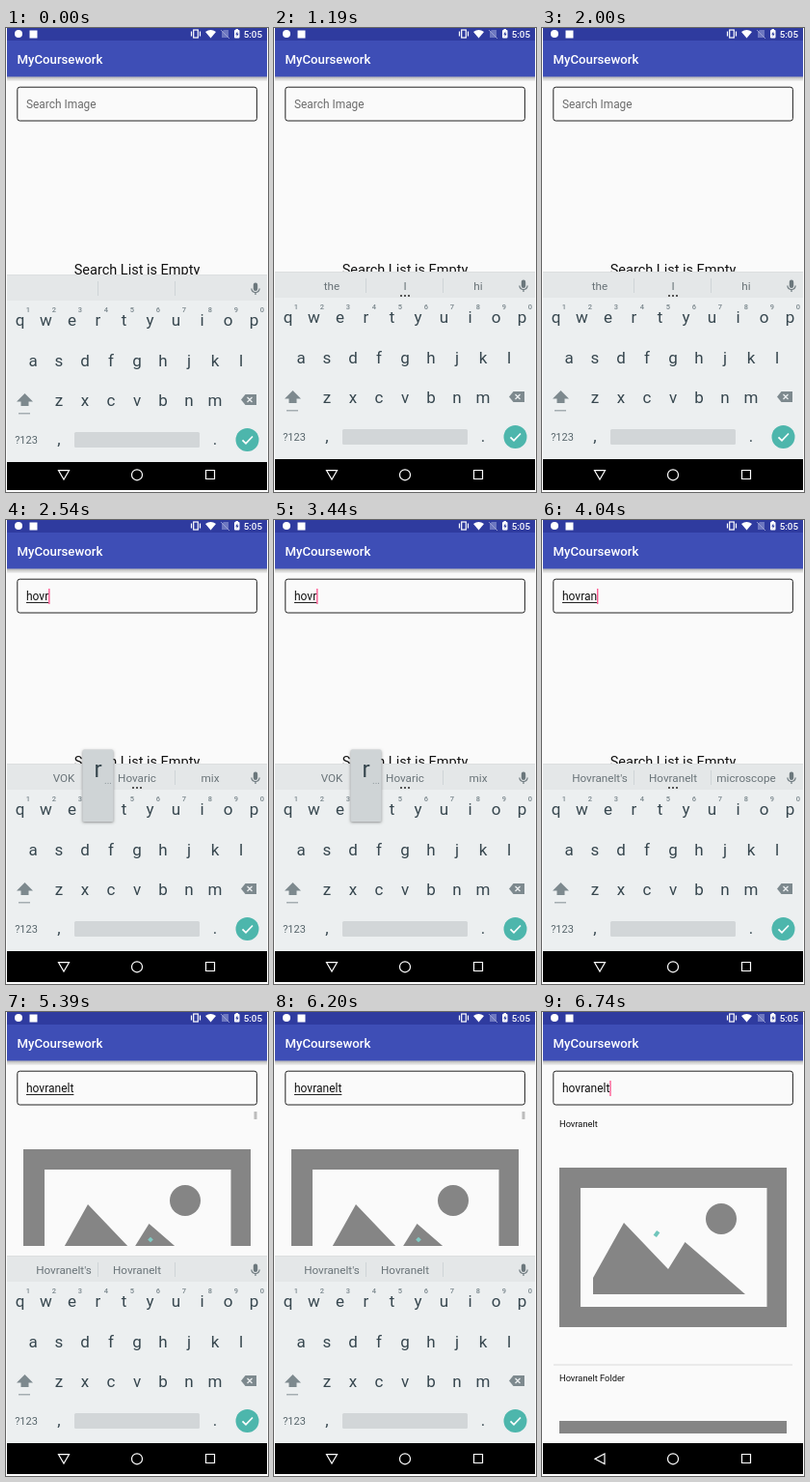
Animation, 272 px wide and 480 px high, one loop 8 s. Source, as an HTML page with a canvas:

```html
<!DOCTYPE html>
<html lang="en">
<head>
<meta charset="utf-8">
<title>Image search</title>
<style>
  html, body { margin: 0; width: 100%; height: 100%; overflow: hidden; background: #fff; }
  canvas { display: block; width: 272px; height: 480px; }
</style>
</head>
<body>
<canvas id="stage"></canvas>
<script>
const canvas = document.getElementById('stage');
const scale = window.devicePixelRatio || 1;
canvas.width = 272 * scale;
canvas.height = 480 * scale;
const c = canvas.getContext('2d');

const LOOP = 8000;
const NAME = 'Hovranelt';
const GREY = '#858585', TEAL = '#4db6ac', INK = '#37474f', KEY_ICON = '#7d898e';
const PAGE = '#fafafa', KEYS = '#eceff0';

const scenes = [
  { at: 0, drop: 3, hints: [] },
  { at: 1190, hints: ['the', 'I', 'hi'], more: true },
  { at: 2540, typed: 4, caret: true, hints: ['VOK', 'Hovaric', 'mix'], more: true, popup: true },
  { at: 4040, typed: 6, caret: true, hints: [NAME + "'s", NAME, 'microscope'], more: true },
  { at: 5390, typed: 9, hints: [NAME + "'s", NAME], results: true },
  { at: 6740, typed: 9, caret: true, results: true }
];

function box(x, y, w, h, color, radius = 0) {
  c.fillStyle = color;
  c.beginPath();
  c.roundRect(x, y, w, h, radius);
  c.fill();
}

function disc(x, y, r, color) {
  c.fillStyle = color;
  c.beginPath();
  c.arc(x, y, r, 0, Math.PI * 2);
  c.fill();
}

function shape(path, color) {
  c.fillStyle = color;
  c.fill(new Path2D(path));
}

function line(path, color, width = 1) {
  c.strokeStyle = color;
  c.lineWidth = width;
  c.stroke(new Path2D(path));
}

function text(str, x, y, size, color, align = 'left', weight = 400) {
  c.font = `${weight} ${size}px Roboto, sans-serif`;
  c.textAlign = align;
  c.fillStyle = color;
  c.fillText(str, x, y);
}

function tilted(x, y, w, h, angle, color) {
  c.save();
  c.translate(x, y);
  c.rotate(angle * Math.PI / 180);
  box(-w / 2, -h / 2, w, h, color);
  c.restore();
}

function drawBars() {
  box(1, 0, 270, 13, '#2f3b9f');
  box(1, 13, 270, 37.5, '#3e4eb6');
  const shade = c.createLinearGradient(0, 50.5, 0, 55.5);
  shade.addColorStop(0, 'rgba(0,0,0,.28)');
  shade.addColorStop(1, 'rgba(0,0,0,0)');
  box(1, 50.5, 270, 5, shade);
  text('MyCoursework', 11.5, 37, 13.2, '#fff', 'left', 500);

  disc(13, 6, 4, '#fff');
  box(24.5, 2.5, 8, 8, '#fff');
  c.strokeStyle = '#fff';
  c.lineWidth = 1.2;
  c.strokeRect(194.7, 2, 4.6, 8);
  line('M192.5 3.5V8.5M201.5 3.5V8.5', '#fff', 1.2);
  shape('M207 4Q212.5 0 218 4L212.5 10.5Z', '#fff');
  shape('M224 4L226 2H231V10H224Z', '#6d77c0');
  line('M223 2L232 11', '#a5abd8', .8);
  box(237, 2, 5.5, 8.5, '#fff', 1);
  box(238.5, 1, 2.5, 2, '#fff');
  shape('M240.3 3.5L238.3 6.7H239.6V9L241.6 5.8H240.3Z', '#303f9f');
  text('5:05', 266, 10, 9.8, '#fff', 'right', 500);
}

function drawField(s) {
  c.strokeStyle = '#222';
  c.lineWidth = 1;
  c.beginPath();
  c.roundRect(11.8, 61.2, 248.6, 34.8, 2.5);
  c.stroke();
  if (!s.typed) {
    text('Search Image', 21, 83.2, 11.9, '#6c6c6c');
    return;
  }
  const word = NAME.toLowerCase().slice(0, s.typed);
  text(word, 21, 83.2, 12, '#111');
  const width = c.measureText(word).width;
  if (s.hints) box(21, 85, width, 1, '#222');
  if (s.caret) box(21 + width, 71, 1.2, 16, '#ff4081');
}

function drawPicture(y) {
  box(18, y, 236, 165, GREY);
  box(40, y + 21, 193.5, 123, PAGE);
  disc(186, y + 53, 16, GREY);
  c.save();
  c.translate(0, y);
  shape('M53 114L85 57L131 105L148.5 77L211 131H53Z', GREY);
  c.restore();
}

function drawResults(s) {
  c.save();
  c.beginPath();
  c.rect(1, 97, 270, s.hints ? 145 : 339);
  c.clip();
  drawPicture(s.hints ? 142 : 161);
  if (!s.hints) {
    text(NAME, 18, 119, 9.3, '#111');
    box(12, 364.5, 248, 1, '#dcdcdc');
    text(NAME + ' Folder', 18, 382, 9.3, '#111');
    drawPicture(423);
  }
  c.restore();
  if (s.hints) {
    tilted(150, 235.5, 4, 4, 45, '#80cbc4');
    box(257.5, 103, 3, 8, '#bdbdbd');
  } else {
    tilted(119, 229.5, 4, 6, 35, '#70c6bc');
  }
}

function drawKeyboard(s) {
  c.save();
  c.translate(0, s.drop || 0);
  box(1, 252, 270, 195, KEYS);
  box(1, 252, 270, 27, '#e4e7e8');
  box(1, 252, 270, 1, '#dcdfe0');
  box(95, 259, 1, 15, '#cfd4d7');
  box(175, 259, 1, 15, '#cfd4d7');
  s.hints.forEach((word, i) => text(word, 60 + 76 * i, 271, 11.7, '#697378', 'center'));
  if (s.more) for (const x of [131, 135, 139]) box(x, 276, 2, 2, '#555');

  box(256.8, 260.5, 4.4, 8.5, '#6b777c', 2.2);
  line('M254.8 266.5Q255.3 270.5 259 270.5Q262.7 270.5 263.2 266.5M259 270.5V273', '#6b777c', 1.2);

  [['qwertyuiop', 14.5, 305], ['asdfghjkl', 28, 346.5], ['zxcvbnm', 55, 387.5]].forEach(([keys, x, y]) =>
    [...keys].forEach((key, i) => text(key, x + 27 * i, y, 17, INK, 'center')));
  [...'1234567890'].forEach((n, i) => text(n, 23 + 27 * i, 291, 7.5, '#78858b', 'center', 500));

  shape('M19.5 375L28 383.5H23.5V388H15.5V383.5H11Z', KEY_ICON);
  box(13, 395, 12, 1.5, '#a4adb1');
  shape('M244 381.5L248.5 376H260V387H248.5Z', KEY_ICON);
  line('M250.5 379L255.5 384M255.5 379L250.5 384', KEYS, 1.3);

  text('?123', 21, 427, 11, '#58666c', 'center');
  text(',', 55, 428, 17, INK, 'center');
  box(71, 415, 130, 16, '#d2d6d8', 1.5);
  text('.', 217, 428, 17, INK, 'center');
  disc(250.5, 423, 12, TEAL);
  line('M245.5 423.3L249 426.8L256 419.5', '#fff', 1.7);

  if (s.popup) {
    c.save();
    c.shadowColor = 'rgba(0,0,0,.4)';
    c.shadowBlur = 3 * scale;
    c.shadowOffsetY = scale;
    box(79.5, 237.5, 32, 74.5, '#cfd4d6', 1.5);
    c.restore();
    text('r', 95.5, 265.5, 24, INK, 'center');
    text('...', 106, 273, 10, '#8a9499', 'center');
  }
  c.restore();
}

function drawNavigation(s) {
  const top = 446 + (s.drop || 0);
  box(1, top, 270, 478 - top, '#000');
  line(s.hints ? 'M54.5 457.7H65.5L60 467Z' : 'M65 457V467.5L55 462.2Z', '#fff', 1.2);
  line('M141.5 462.3A5.5 5.5 0 1 1 130.5 462.3A5.5 5.5 0 1 1 141.5 462.3', '#fff', 1.2);
  line('M207.5 457.5H216.5V466.5H207.5Z', '#fff', 1.2);
}

function draw(now) {
  const t = now % LOOP;
  const s = scenes.findLast(scene => scene.at <= t) || scenes[0];
  c.setTransform(scale, 0, 0, scale, 0, 0);
  box(0, 0, 272, 480, '#fff');
  box(1, 0, 270, 478, PAGE);
  drawBars();
  drawField(s);
  if (s.results) drawResults(s);
  else text('Search List is Empty', 136, 254.5, 14.5, '#111', 'center');
  if (s.hints) drawKeyboard(s);
  drawNavigation(s);
}

const start = performance.now();
function tick(now) {
  draw(Math.max(0, now - start));
  requestAnimationFrame(tick);
}
draw(0);
requestAnimationFrame(tick);
</script>
</body>
</html>
```
